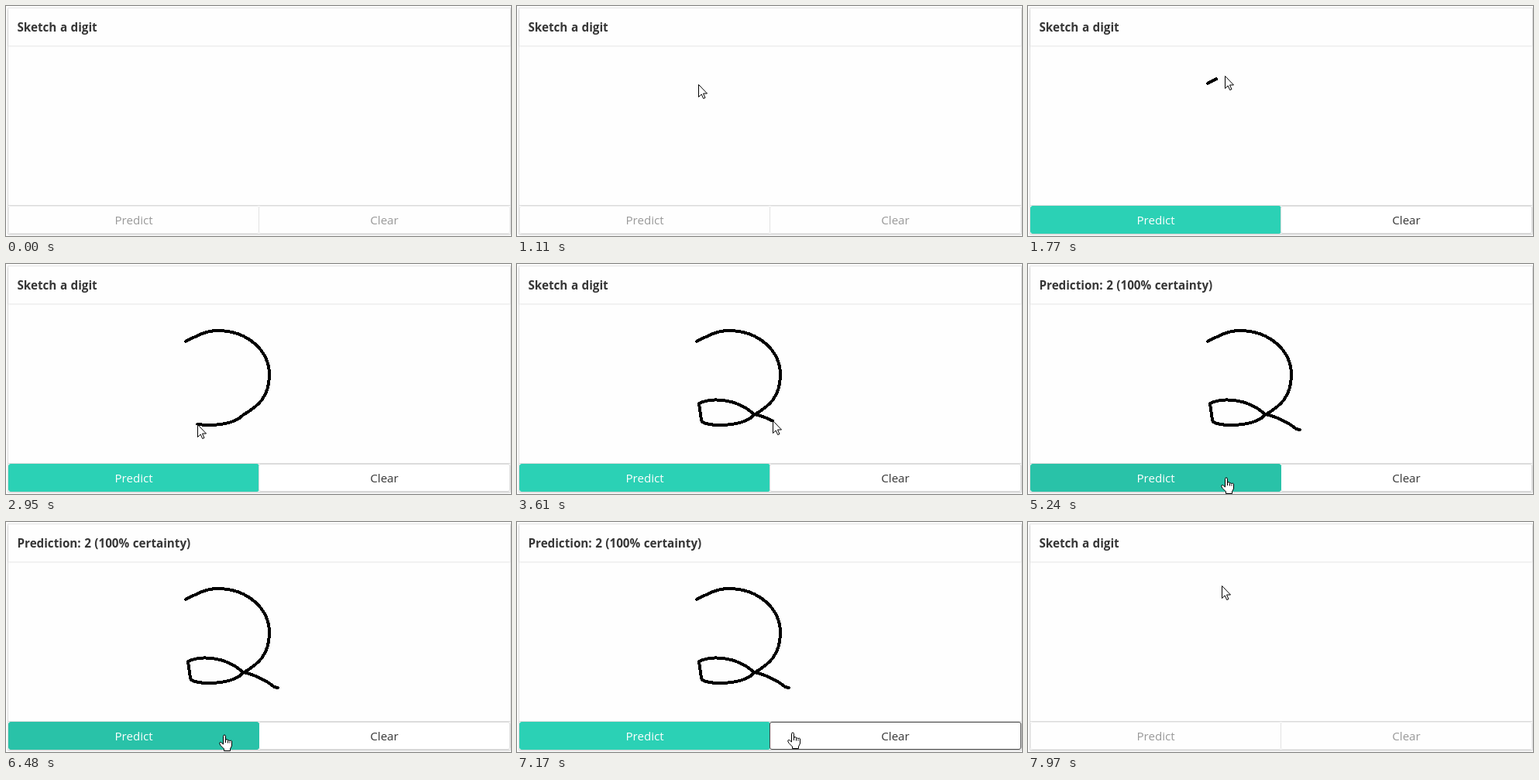
Recreate the animation shown at these times as an HTML page. Size 652 by 297 pixels, loop 8 s.

```html
<!DOCTYPE html>
<html lang="en">
<head>
<meta charset="utf-8">
<title>Sketch a digit</title>
<style>
  html, body { margin: 0; width: 100%; height: 100%; overflow: hidden; background: #fefefe; }
  body { position: relative; font: 15.1px/34px "Open Sans", "Noto Sans", sans-serif; color: #363636; }
  div { position: absolute; box-sizing: border-box; }
  #card { left: 3px; top: 3px; width: 648px; height: 291px;
    box-shadow: 0 2px 3px rgba(10,10,10,.1), 0 0 0 1px rgba(10,10,10,.1); }
  #title { width: 648px; height: 48px; padding-left: 11.5px; font-size: 15.2px; font-weight: 700;
    line-height: 48px; word-spacing: .6px; box-shadow: 0 1px 2px rgba(10,10,10,.1); }
  #footer { top: 254px; width: 648px; height: 1px; background: #dbdbdb; }
  /* The two buttons overlap by one pixel */
  .button { top: 255px; height: 36px; border: 1px solid #dbdbdb; border-radius: 3px;
    text-align: center; background: #fff; }
  #predict { width: 324px; }
  #clear { left: 323px; width: 325px; }
  .off { opacity: .5; }
  .hover { z-index: 1; }
  #predict.on { background: #2bd1b5; border-color: #2bd1b5; color: #fff; }
  #predict.hover { background: #29c2a8; border-color: #29c2a8; }
  #clear.hover { border-color: #b5b5b5; }
  #clear.active { border-color: #4a4a4a; }
  svg { position: absolute; left: 0; top: 0; z-index: 2; }
</style>
</head>
<body>
<div id="card">
  <div id="title"></div>
  <div id="footer"></div>
  <div id="predict">Predict</div>
  <div id="clear">Clear</div>
</div>
<svg width="652" height="297" fill="none" stroke="#000" stroke-linejoin="round">
  <path id="digit" stroke-width="4" stroke-linecap="round" shape-rendering="crispEdges"
    d="M232 100C246 93 258 86 273 86C312 86 340 112 340 143C340 172 325 184 306 195
       C298 204 280 208 262 208C250 208 240 206 238 202L235 180
       C250 173 282 172 306 194C322 197 340 207 346 213L351 214"/>
  <g id="cursor">
    <path id="arrow" fill="#fff" d="M.5.5V16.5L4.2 13 6.7 18.5 9 17.5 6.5 12H11.5z"/>
    <g id="hand" transform="translate(-7 -1)">
      <path fill="#fff" d="M5.5 13V2.5a1.5 1.5 0 0 1 3 0V8a1.5 1.5 0 0 1 3 .3 1.5 1.5 0 0 1 2.5 .7 1.3 1.3 0 0 1 2.5 1V15l-2 4v2.5h-8V19L2 14.5 .7 12q0-2 2-1.5z"/>
      <path d="M8.5 8v3M11.5 8.5v3M14 9.5v2"/>
    </g>
    <path id="blocked" stroke-width="2" d="M-6 0a6 6 0 1 0 12 0a6 6 0 1 0-12 0M-4-4L4 4"/>
  </g>
</svg>
<script>
const $ = id => document.getElementById(id);
const digit = $('digit'), total = digit.getTotalLength();
const LOOP = 8000, FIRST = 432, TICK = 132.1;
const DRAW = 1500, INK = 1770, DRAWN = 3960, RESULT = 5240, PRESS = 7170, RESET = 7330;

// Pointer trips between resting places; a higher power slows down more at the end
const trips = [
  { start: 440, end: 1110, from: [257, 274], to: [234, 101], power: 2 },
  { start: 4290, end: 4820, from: [351, 214], to: [256, 276], power: 3 },
  { start: 6240, end: 6760, from: [256, 276], to: [356, 272], power: 1 },
  { start: RESET, end: 7950, from: [354, 270], to: [250, 82], power: 1 }
];

const progress = (t, a, b) => Math.min(1, Math.max(0, (t - a) / (b - a)));
const smooth = u => u * u * (3 - 2 * u);

function pointerAt(t, drawn) {
  if (t >= INK && t < trips[1].start) {
    const lead = 13 * (1 - drawn) ** 3;
    const p = digit.getPointAtLength(drawn * total + lead);
    return [p.x, p.y];
  }
  const { start, end, from, to, power } = trips.findLast(trip => trip.start <= t) || trips[0];
  const u = 1 - (1 - progress(t, start, end)) ** power;
  return from.map((v, i) => v + (to[i] - v) * u);
}

function draw(now) {
  const t = now % LOOP;
  // The screen refreshes in coarse ticks
  const tick = FIRST + Math.floor((t - FIRST) / TICK) * TICK;
  const enabled = t >= INK && t < RESET;
  const drawn = smooth(progress(tick, DRAW, DRAWN));
  const moved = t >= INK && tick < INK ? INK : t >= RESET ? Math.max(tick, RESET) : tick;
  const [x, y] = pointerAt(moved, drawn).map(Math.round);

  const overButton = y > 258;
  const kind = t < trips[0].start ? '' : !overButton ? 'arrow' : enabled ? 'hand' : 'blocked';
  for (const id of ['arrow', 'hand', 'blocked']) $(id).style.display = id === kind ? '' : 'none';
  $('cursor').setAttribute('transform', `translate(${x} ${y})`);

  const target = kind !== 'hand' ? '' : x < 327 ? 'predict' : 'clear';
  for (const id of ['predict', 'clear']) {
    const hover = id === target ? ' hover' : '';
    const active = hover && t >= PRESS ? ' active' : '';
    $(id).className = 'button ' + (enabled ? 'on' : 'off') + hover + active;
  }

  const predicted = t >= RESULT && t < RESET;
  $('title').textContent = predicted ? 'Prediction: 2 (100% certainty)' : 'Sketch a digit';
  digit.style.display = enabled ? '' : 'none';
  digit.setAttribute('stroke-dasharray', drawn < 1 ? `${drawn * total} ${total}` : 'none');
  requestAnimationFrame(draw);
}
draw(performance.now());
</script>
</body>
</html>
```
